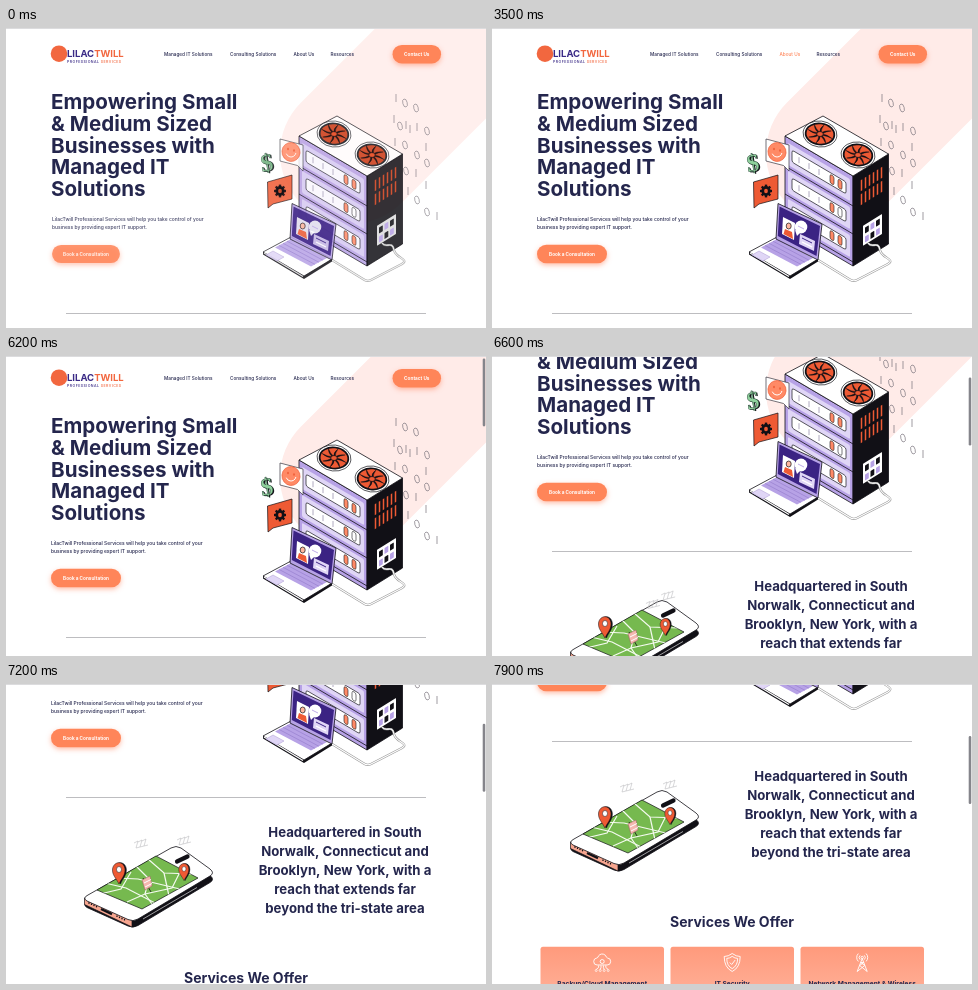
Write an HTML page with a canvas that moves like this. It is 480 by 300 pixels and loops after 8 s.

```html
<!DOCTYPE html>
<html lang="en">
<head>
<meta charset="utf-8">
<title>Managed IT Solutions</title>
<style>
html, body { margin: 0; width: 100%; height: 100%; overflow: hidden; background: #fff; }
canvas { display: block; width: 480px; height: 300px; }
</style>
</head>
<body>
<canvas id="stage"></canvas>
<script>
const canvas = document.getElementById('stage');
const c = canvas.getContext('2d');
const dpr = window.devicePixelRatio || 1;
canvas.width = 480 * dpr;
canvas.height = 300 * dpr;

const LOOP = 8000, STEP = 100;
const NAVY = '#24264d', INK = '#111016', ORANGE = '#ff8559', RED = '#ee5a34';
const LILAC = '#b7a2e6', PALE = '#e0d6f6', PURPLE = '#3b2383';
const clamp = v => Math.max(0, Math.min(1, v));
const ease = v => { v = clamp(v); return v * v * (3 - 2 * v); };

// time, offset, speed
const scrollKeys = [
  [6000, 0, 0], [6100, 1, .015], [6200, 4, .12], [6600, 90, .18],
  [7200, 172, .11], [7900, 228, .045], [8000, 232, .035]
];

function scrollAt(t) {
  if (t <= scrollKeys[0][0]) return 0;
  const i = scrollKeys.findIndex(k => k[0] >= t);
  const [t0, y0, v0] = scrollKeys[i - 1], [t1, y1, v1] = scrollKeys[i];
  const d = t1 - t0, u = (t - t0) / d, w = 1 - u;
  return y0 * (1 + 2 * u) * w * w + v0 * d * u * w * w
       + y1 * u * u * (3 - 2 * u) - v1 * d * u * u * w;
}

// Rises at the start and falls at the end of a hover
const hover = (t, a, b) => ease((t - a) / 200) * ease((b - t) / 200);

function mix(a, b, k) {
  const part = (s, i) => parseInt(s.slice(1 + 2 * i, 3 + 2 * i), 16);
  return `rgb(${[0, 1, 2].map(i => Math.round(part(a, i) + (part(b, i) - part(a, i)) * k))})`;
}

function paint(fill, stroke, width = .8) {
  if (fill) { c.fillStyle = fill; c.fill(); }
  if (stroke) { c.strokeStyle = stroke; c.lineWidth = width; c.stroke(); }
}

function poly(points, fill, stroke, width, open) {
  c.beginPath();
  points.forEach(([x, y]) => c.lineTo(x, y));
  if (!open) c.closePath();
  paint(fill, stroke, width);
}

const line = (points, color, width) => poly(points, null, color, width, true);

function oval(x, y, rx, ry, fill, stroke, width, turn = 0) {
  c.beginPath();
  c.ellipse(x, y, rx, ry, turn, 0, Math.PI * 2);
  paint(fill, stroke, width);
}

function box(x, y, w, h, r, fill, stroke, width) {
  c.beginPath();
  c.roundRect(x, y, w, h, r);
  paint(fill, stroke, width);
}

function text(s, x, y, size, color, weight = 500, align = 'left', spacing = 0) {
  c.font = `${weight} ${size}px Inter, sans-serif`;
  c.letterSpacing = spacing + 'px';
  c.textAlign = align;
  c.fillStyle = color;
  c.fillText(s, x, y);
  const w = c.measureText(s).width;
  c.letterSpacing = '0px';
  return w;
}

function group(draw, x = 0, y = 0, transform) {
  c.save();
  c.translate(x, y);
  if (transform) c.transform(...transform);
  draw();
  c.restore();
}

function button(label, cx, cy, w, h, heat = 0) {
  c.save();
  c.shadowColor = 'rgba(255,125,85,.5)';
  c.shadowBlur = 5 * dpr;
  c.shadowOffsetY = 2 * dpr;
  box(cx - w / 2, cy - h / 2, w, h, h / 2, mix(ORANGE, '#f4774a', heat));
  c.restore();
  text(label, cx, cy + 1.7, 4.7, '#fff', 700, 'center');
}

function header(t) {
  oval(53, 25.7, 8.3, 8.3, '#f2673f');
  const w = text('LILAC', 61, 29, 9.5, '#3a2a86', 700);
  text('TWILL', 61 + w, 29, 9.5, '#f2673f', 700);
  const p = text('PROFESSIONAL ', 61, 34.5, 3.6, '#3a2a86', 500, 'left', .42);
  text('SERVICES', 61 + p, 34.5, 3.6, '#f2673f', 500, 'left', .42);

  const nav = [
    ['Managed IT Solutions', 158, 1800, 2400], ['Consulting Solutions', 224, 2500, 2900],
    ['About Us', 287.5, 3100, 3750], ['Resources', 324.5, 3700, 4150]
  ];
  nav.forEach(([s, x, a, b]) => text(s, x, 28, 4.7, mix(NAVY, '#ff8559', hover(t, a, b))));
  button('Contact Us', 410.8, 26.2, 48.5, 18.6, hover(t, 4000, 5000));
}

function fan(x, y) {
  oval(x, y, 17, 13, '#fff', INK, .7, .12);
  oval(x, y, 15.3, 11.3, INK, null, 0, .12);
  oval(x, y, 13.5, 9.7, RED, null, 0, .12);
  group(() => {
    for (let i = 0; i < 8; i++) {
      c.rotate(Math.PI / 4);
      c.beginPath();
      c.moveTo(2, 0);
      c.quadraticCurveTo(7, -1, 12, 4);
      c.quadraticCurveTo(7, 1.3, 2, 1.2);
      paint(INK, INK, .4);
    }
  }, x, y, [1, .12, 0, .78, 0, 0]);
  oval(x, y, 3.3, 2.5, RED, INK, .8);
}

function server() {
  // Top, front and side faces
  poly([[293, 108], [361, 148], [361, 238], [293, 198]], LILAC, INK);
  poly([[361, 148], [396.5, 126], [396.5, 216], [361, 238]], INK, INK);
  poly([[293, 108], [331, 88], [396.5, 126], [361, 148]], '#fff', INK);
  fan(328, 106);
  fan(366, 127);

  group(() => {
    for (let i = 0; i < 3; i++) {
      const y = 10 + i * 28;
      line([[0, y + 20], [68, y + 20]], INK, .7);
      box(3, y - 5, 62, 22, 1.5, PALE, null);
      box(7, y, 54, 12, 2, '#fff', INK, .6);
      for (let k = 0; k < 3; k++) line([[14 + k * 10, y + 3], [14 + k * 10, y + 9]], '#8d83a5', .6);
      box(45, y + 1.5, 4, 9, 2, '#ff8a66', INK, .5);
      box(53, y + 1.5, 4, 9, 2, i === 1 ? '#fff' : '#ff8a66', INK, .5);
    }
  }, 293, 108, [1, .588, 0, 1, 0, 0]);

  group(() => {
    for (let row = 0; row < 2; row++)
      for (let k = 0; k < 6; k++)
        line([[8.5 + k * 4, 9 + row * 14], [8.5 + k * 4, 20 + row * 14]], RED, 1.5);
    box(10, 56, 19, 20, .5, '#fff');
    for (let i = 0; i < 6; i++)
      box(12 + i % 3 * 5.5, 59 + Math.floor(i / 3) * 9, 3.8, 6, .5, i % 2 ? LILAC : INK);
  }, 361, 148, [1, -.62, 0, 1, 0, 0]);
}

function cable() {
  c.beginPath();
  c.moveTo(376, 215);
  c.bezierCurveTo(380, 221, 386, 212, 388, 222);
  c.bezierCurveTo(389, 230, 404, 231, 396, 236);
  c.lineTo(365, 252);
  c.quadraticCurveTo(361, 254, 357, 251);
  c.lineTo(326, 232);
  c.lineJoin = 'round';
  paint(null, '#999', 2.2);
  paint(null, '#fff', 1.1);
}

function laptop() {
  poly([[257, 224], [285, 209], [326, 231], [298, 248]], '#fff', INK);
  poly([[257, 224], [298, 248], [326, 231], [326, 233.5], [298, 251], [257, 226.5]], INK);
  line([[258, 225], [297, 248.4]], '#fff', 1.2);
  poly([[269, 219.5], [285, 211], [321, 230], [305, 238.5]], LILAC);
  for (let i = 1; i < 4; i++)
    line([[269 + i * 4, 219.5 - i * 2.1], [305 + i * 4, 238.5 - i * 2.1]], '#8a73c4', .5);
  poly([[267, 223], [278, 229], [271, 233], [260, 227]], PALE, '#9a86c8', .4);
  poly([[286, 175.5], [330, 196], [326, 232], [284, 211]], LILAC, INK);
  poly([[287.5, 178.5], [328, 198], [324.5, 228], [285.8, 208]], PURPLE);
  // Window contents
  poly([[291, 189], [303, 195], [302, 212], [290, 206]], '#fff');
  poly([[291.5, 206], [293, 201], [300, 204], [301, 211]], RED);
  oval(296.7, 198, 2.5, 3, '#ffb69e', INK, .7);
  oval(309, 199, 6.3, 6.5, '#fff', null);
  poly([[303, 202], [305, 208], [309, 204]], '#fff');
  line([[306, 198], [312, 201]], LILAC, .9);
  poly([[308, 206], [323, 213], [322, 223], [307, 216]], PALE);
  line([[310, 210], [320, 215]], PURPLE, 1);
  line([[310, 214], [320, 219]], '#fff', 1.3);
}

function bubbles(t) {
  poly([[274, 111], [297, 117], [297, 143], [291.5, 137.5], [274, 133]], '#fff', '#39363f', .7);
  oval(285, 124, 9, 9.5, '#ff8a66', RED, .7, -.3);
  oval(282, 121, .8, 1.2, RED);
  oval(288, 122.5, .8, 1.2, RED);
  c.beginPath();
  c.arc(285, 124, 5, .2, 2.8);
  paint(null, '#fff', 1);

  poly([[261.5, 154], [286, 147], [286, 171], [267, 176], [262, 180]], RED, INK, .7);
  for (let i = 0; i < 4; i++) {
    const a = i * Math.PI / 4, x = Math.cos(a) * 6, y = Math.sin(a) * 6.4;
    line([[274 - x, 163 - y], [274 + x, 163 + y]], INK, 2.4);
  }
  oval(274, 163, 4.6, 5, INK);
  oval(274, 163, 1.9, 2.2, RED);

  group(() => {
    c.font = '700 25px "Liberation Serif", serif';
    c.textAlign = 'center';
    c.lineWidth = 1;
    c.fillStyle = INK;
    c.fillText('$', 1, 8.8);
    c.fillStyle = '#8fd19c';
    c.fillText('$', 0, 8);
    c.strokeStyle = '#29483a';
    c.lineWidth = .5;
    c.strokeText('$', 0, 8);
  }, 261, 135 - Math.sin(t / 1000), [.98, -.18, .15, .98, 0, 0]);
}

function digits() {
  const zeros = [[399, 75], [410, 80], [394, 98], [421, 103], [399, 117], [411, 127],
    [421, 135], [400, 143], [411, 172], [421, 184]];
  const ones = [[390, 70], [388, 91], [404, 101], [411, 99], [389, 114], [400, 97],
    [420, 119], [410, 145], [420, 157], [402, 163], [431, 188]];
  zeros.forEach(([x, y]) => oval(x, y, 2.2, 4.1, null, '#77717a', .7, -.25));
  ones.forEach(([x, y]) => line([[x, y - 4], [x, y + 4]], '#77717a', .7));
}

function hero(t) {
  const enter = ease(t / 600);
  c.save();
  c.globalAlpha = .78 + .22 * enter;
  c.lineCap = 'round';
  line([[345, 125], [545, -75]], '#ffebe8', 142);
  c.lineCap = 'butt';
  c.restore();

  header(t);
  ['Empowering Small', '& Medium Sized', 'Businesses with', 'Managed IT', 'Solutions']
    .forEach((s, i) => text(s, 45, 81.3 + 21.6 * i, 20.6, NAVY, 700));

  c.save();
  c.globalAlpha = .85 + .15 * enter;
  const x = 46 - enter;
  text('LilacTwill Professional Services will help you take control of your', x, 192.8, 4.95, NAVY);
  text('business by providing expert IT support.', x, 200.8, 4.95, NAVY);
  const size = .97 + .03 * enter;
  button('Book a Consultation', 80, 226, 70 * size, 18.6 * size, hover(t, 5300, 5900));
  digits();
  server();
  cable();
  laptop();
  bubbles(t);
  c.restore();
  line([[60, 285.5], [420, 285.5]], '#bdbdc0', 1);
}

function pin(x, y, s) {
  group(() => {
    for (const [dx, color] of [[1.4, INK], [0, RED]]) {
      c.beginPath();
      c.moveTo(dx, 12);
      c.bezierCurveTo(dx - 3, 6, dx - 7, 3, dx - 6.5, -3);
      c.bezierCurveTo(dx - 5, -12, dx + 6, -11, dx + 6, -2);
      c.bezierCurveTo(dx + 6, 4, dx + 2, 7, dx, 12);
      paint(color, INK, .5);
    }
    oval(0, -2.5, 2.5, 3, '#fff', INK, .5);
  }, x, y, [s, 0, 0, s, 0, 0]);
}

function scribble(x, y) {
  for (let i = 0; i < 3; i++)
    line([[x - 6 + i * 4, y - 2 - i], [x - 2 + i * 4, y - 4 - i], [x - 4 + i * 4, y + 3 - i], [x + i * 4, y + 2 - i]], '#bdbdc0', .6);
}

function phone(t) {
  const glide = ease((t - 6500) / 600);
  const rim = dy => {
    c.beginPath();
    c.moveTo(82, 383 + dy);
    c.lineTo(165, 336 + dy);
    c.quadraticCurveTo(170, 333 + dy, 175, 336 + dy);
    c.lineTo(204, 357 + dy);
    c.quadraticCurveTo(209, 361 + dy, 204, 364 + dy);
    c.lineTo(132, 407 + dy);
    c.quadraticCurveTo(127, 410 + dy, 122, 407.5 + dy);
    c.lineTo(81, 389 + dy);
    c.quadraticCurveTo(76, 386 + dy, 82, 383 + dy);
    c.closePath();
  };
  rim(6.5);
  paint(INK, INK);
  poly([[78.5, 386], [126, 408.5], [126, 415], [78.5, 392.5]], '#f6a58f', INK, .7);
  rim(0);
  paint('#fff', INK);
  for (let i = 0; i < 8; i++) {
    const x = 83 + i * 2.5 + (i > 3 ? 18 : 0);
    oval(x, 391 + (x - 83) * .47, .7, .9, INK);
  }
  line([[95, 397], [106, 402.2]], INK, 2.4);
  line([[137, 407], [191, 375.5]], '#fff', .6);

  group(() => {
    poly([[91, 378], [150, 344], [192, 366], [136, 397]], '#76b94f', INK, .7);
    c.clip();
    [
      [[99, 371], [120, 376], [151, 392]], [[110, 366], [132, 367], [178, 378]],
      [[130, 354], [143, 367], [139, 382], [148, 395]], [[142, 347], [158, 361], [187, 362]],
      [[94, 382], [115, 377], [125, 360]], [[158, 361], [163, 384]],
      [[121, 390], [139, 382], [166, 376], [176, 356]]
    ].forEach(p => line(p, '#f4faef', 1.2));
  });
  c.lineCap = 'round';
  line([[171, 349.5], [181.5, 344.5]], INK, 4.2);
  c.lineCap = 'butt';
  line([[137, 366], [145, 380]], INK, .8);
  poly([[136, 368], [144, 364], [146, 374], [139, 378]], '#f6b7b0', '#9b5d60', .5);
  line([[138, 371], [145, 367.5]], '#fff', 1);
  line([[139, 375], [146, 371.5]], '#fff', 1);
  pin(113, 360, 1);
  pin(173 + 5 * glide, 360 - glide, .8);
  scribble(162 - 28 * glide, 340 - 7 * glide);
  scribble(175 + 2 * glide, 331 - glide);
}

function icon(kind, x, y) {
  c.lineJoin = 'round';
  group(() => {
    const white = '#fff', w = .9;
    if (kind === 0) {
      c.beginPath();
      c.arc(-5, -1, 3.5, 1.6, 4.6);
      c.arc(0, -4, 4.5, 3.4, 6);
      c.arc(5, -1, 3.5, 4.8, 1.6);
      c.closePath();
      paint(null, white, w);
      oval(0, -1, 2, 2, null, white, w);
      [-6, -2, 2, 6].forEach(k => {
        line([[k * .6, 3], [k * .6, 5], [k, 7]], white, w);
        oval(k, 8, 1, 1, null, white, .7);
      });
    } else if (kind === 1) {
      for (const s of [1, .68]) {
        c.beginPath();
        c.moveTo(0, -9 * s);
        c.quadraticCurveTo(4 * s, -6 * s, 8 * s, -6 * s);
        c.quadraticCurveTo(8 * s, 5 * s, 0, 9 * s);
        c.quadraticCurveTo(-8 * s, 5 * s, -8 * s, -6 * s);
        c.quadraticCurveTo(-4 * s, -6 * s, 0, -9 * s);
        paint(null, white, w);
      }
      line([[-2.5, 0], [-.5, 2], [3, -2.5]], white, w);
    } else {
      line([[-5, 9], [0, -4], [5, 9], [-2.5, 3], [1.5, 0], [-1.5, 0], [2.5, 3], [-5, 9]], white, w);
      oval(0, -5, 1.2, 1.2, null, white, w);
      [3, 5.5].forEach(r => [0, Math.PI].forEach(a => {
        c.beginPath();
        c.arc(0, -5, r, a - .8, a + .8);
        paint(null, white, w);
      }));
    }
  }, x, y);
}

function services() {
  text('Services We Offer', 240, 471, 14, NAVY, 700, 'center');
  ['Backup/Cloud Management', 'IT Security', 'Network Management & Wireless'].forEach((s, i) => {
    const x = 48.5 + i * 130;
    const g = c.createLinearGradient(0, 491, 0, 590);
    g.addColorStop(0, '#ff9a7c');
    g.addColorStop(1, '#ffc6b4');
    box(x, 490.7, 123.5, 100, 2.5, g);
    icon(i, x + 61.7, 506.5);
    text(s, x + 61.7, 530, 6.6, NAVY, 700, 'center');
  });
}

function render(t) {
  const y = scrollAt(t);
  c.setTransform(dpr, 0, 0, dpr, 0, 0);
  c.fillStyle = '#fff';
  c.fillRect(0, 0, 480, 300);
  group(() => {
    hero(t);
    phone(t);
    ['Headquartered in South', 'Norwalk, Connecticut and', 'Brooklyn, New York, with a',
      'reach that extends far', 'beyond the tri-state area']
      .forEach((s, i) => text(s, 339, 324.6 + 19 * i, 13.2, NAVY, 700, 'center'));
    services();
  }, 0, -y);
  c.fillStyle = '#dcdcde';
  c.fillRect(0, 0, 480, 1);
  if (y > 0) box(476.7, 1.5 + y * .222, 2.6, 68, 1.3, '#85858b');
}

const start = performance.now();
function tick() {
  const t = (performance.now() - start) % LOOP;
  render(Math.floor(t / STEP) * STEP);
  requestAnimationFrame(tick);
}
tick();
</script>
</body>
</html>
```
